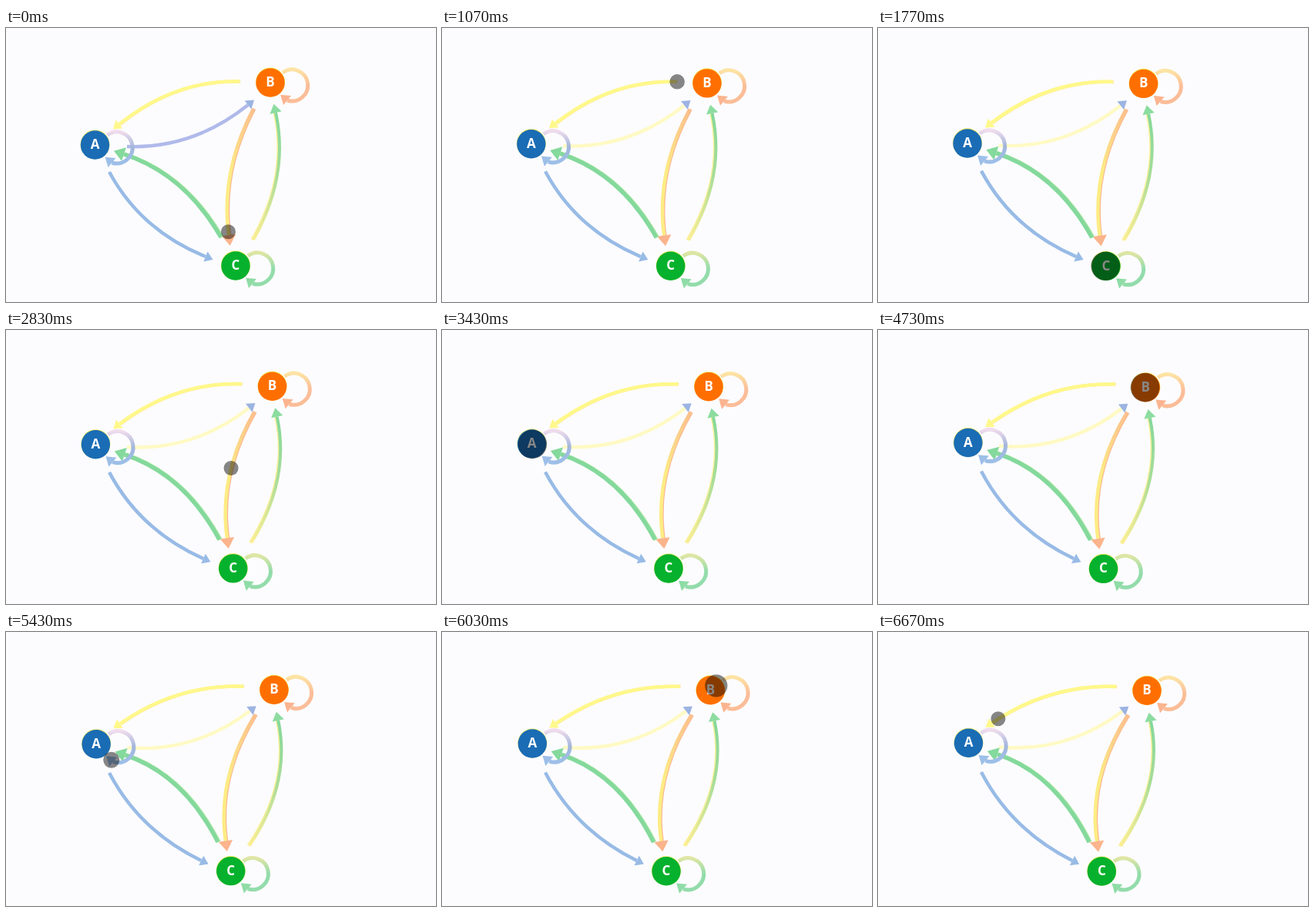
Recreate the animation shown at these times as an HTML page. Size 558 px wide and 356 px high, loop 6710 ms.

```html
<!DOCTYPE html>
<html lang="en">
<head>
<meta charset="utf-8">
<title>Three-state Markov chain</title>
<style>
  html, body { margin: 0; width: 100%; height: 100%; overflow: hidden; background: #fcfcfe; }
  svg { display: block; width: 558px; height: 356px; }
  text { font: 700 17px "Open Sans", "Noto Sans", sans-serif; fill: #fff; text-anchor: middle; }
</style>
</head>
<body>
<svg id="stage" viewBox="0 0 558 356"></svg>
<script>
const LOOP = 6710;
const NODE_R = 19, BALL_R = 9.5, LOOP_R = 20.5;
const stage = document.getElementById('stage');

function add(tag, attrs, parent = stage) {
  const el = document.createElementNS('http://www.w3.org/2000/svg', tag);
  set(el, attrs);
  return parent.appendChild(el);
}
function set(el, attrs) {
  for (const key in attrs) el.setAttribute(key, attrs[key]);
}
const mix = (a, b, k) => a + (b - a) * k;
const mixAll = (a, b, k) => a.map((v, i) => mix(v, b[i], k));

// Positions drift linearly from the first pose to the last.
const nodes = {
  A: { from: [115.5, 152], to: [117.5, 144.3], color: '#1a6cb5' },
  B: { from: [343, 71], to: [349, 76.3], color: '#ff6f00' },
  C: { from: [298, 309], to: [290.3, 311], color: '#05b12d' }
};

// Curves: start, control, end (base of the arrow head).
// Colours: one, or a vertical blend from top to bottom.
const links = {
  BA: { from: [303, 69.5, 219, 67, 147, 125], to: [309, 71, 222, 68, 148, 118],
        width: 4.5, colors: ['#fff88a'], edge: '#fdeaa6' },
  AB: { from: [157, 154, 243, 157, 314, 100], to: [157, 149.5, 246, 157, 317, 103],
        width: 4.5, colors: ['#fffac4'], head: '#9cb4e2' },
  BC: { from: [321, 105, 278, 187, 289, 269], to: [324, 108, 272, 190, 284, 272],
        width: 4.5, colors: ['#fbc08c', '#fdec84', '#fdec84'], edge: '#fbb892', head: '#fbb48c', size: 6 },
  CB: { from: [321, 275, 368, 192, 350, 110], to: [315, 278, 371, 197, 354, 116],
        width: 4, colors: ['#84d89a', '#a8dd98', '#fbee94'], edge: '#fbf09c', head: '#8cdca0', size: 5 },
  CA: { from: [279, 272, 232, 190, 153, 164], to: [274, 273, 230, 184, 155, 159],
        width: 5.5, colors: ['#84d99c'], edge: '#b8ecac', size: 6 },
  AC: { from: [134, 187, 175, 263, 259, 297], to: [134, 182, 173, 257, 252, 297],
        width: 4.5, colors: ['#98bbe6'] },
  AA: { width: 5, colors: ['#f0dcec', '#a2b6dc', '#9dbfe8'], head: '#9dbfe8' },
  BB: { width: 5, colors: ['#fde4a4', '#fbbd98', '#fbbd98'], head: '#fbb48f' },
  CC: { width: 5, colors: ['#dfe6a4', '#93dcab', '#93dcab'], head: '#8fdca6' }
};

// The walk through the states, one hop per unit of phase.
const walk = 'BCBBACABCAABBAABBA';
// [time in ms, phase]: the walk runs at a nearly steady pace.
const pace = [[0, 0.735], [1070, 3.245], [1770, 4.93], [2830, 7.48],
              [4030, 10.37], [5430, 13.757], [6670, 16.72], [6710, 16.81]];

function paint(key, colors) {
  if (colors.length === 1) return colors[0];
  const blend = add('linearGradient', { id: 'blend' + key, x1: 0, y1: 0, x2: 0, y2: 1 });
  colors.forEach((color, i) =>
    add('stop', { offset: i / (colors.length - 1), 'stop-color': color }, blend));
  return `url(#blend${key})`;
}

for (const key in links) {
  const link = links[key];
  const line = { fill: 'none', 'stroke-width': link.width };
  if (link.edge) link.under = add('path', { ...line, stroke: link.edge });
  link.path = add('path', { ...line, stroke: paint(key, link.colors) });
  link.tip = add('path', { fill: link.head || link.colors[0] });
}
for (const key in nodes) {
  const node = nodes[key];
  node.rim = add('circle', { r: NODE_R, fill: '#f4ec5a' });
  node.disc = add('circle', { r: NODE_R - 0.3, fill: node.color });
  node.label = add('text', {});
  node.label.textContent = key;
}
const ball = add('circle', { fill: '#000', 'fill-opacity': 0.47 });

function placeLink(key, k) {
  const link = links[key];
  let d, end, angle;
  if (link.from) {
    const [x0, y0, cx, cy, x1, y1] = mixAll(link.from, link.to, k);
    d = `M${x0} ${y0}Q${cx} ${cy} ${x1} ${y1}`;
    end = [x1, y1];
    angle = Math.atan2(y1 - cy, x1 - cx);
  } else {
    const [x, y] = nodes[key[0]].at;
    end = [x + 22, y + 23];
    d = `M${x + 16} ${y - 13}A${LOOP_R} ${LOOP_R} 0 1 1 ${end[0]} ${end[1]}`;
    angle = Math.atan2(-7.5, -9);
  }
  const size = link.size || link.width;
  set(link.path, { d });
  if (link.under) set(link.under, { d, transform: key === 'CB' ? 'translate(-1.5 0)' : 'translate(1.2 0)' });
  set(link.tip, {
    d: `M0 ${-1.55 * size}L${2.3 * size} 0L0 ${1.55 * size}Z`,
    transform: `translate(${end[0]} ${end[1]}) rotate(${angle * 180 / Math.PI})`
  });
}

function phaseAt(t) {
  const i = pace.findIndex(p => t < p[0]);
  const [t0, p0] = pace[i - 1], [t1, p1] = pace[i];
  return mix(p0, p1, (t - t0) / (t1 - t0));
}

// Each hop: leave the node and shrink, follow the link, grow into the next node.
function placeBall(phase) {
  const hop = Math.floor(phase), part = phase - hop;
  const from = walk[hop], to = walk[hop + 1];
  const path = links[from + to].path;
  const pointAt = p => {
    const q = path.getPointAtLength(path.getTotalLength() * p);
    return [q.x, q.y];
  };
  let at, r = BALL_R;
  if (part < 0.25) {
    const k = (part / 0.25) ** 3;
    at = mixAll(nodes[from].at, pointAt(0), k);
    r = mix(NODE_R, BALL_R, k);
  } else if (part < 0.75) {
    at = pointAt((part - 0.25) * 2);
  } else {
    const k = 1 - (1 - (part - 0.75) / 0.25) ** 3;
    at = mixAll(pointAt(1), nodes[to].at, k);
    r = mix(BALL_R, NODE_R, k);
  }
  set(ball, { cx: at[0], cy: at[1], r });
}

function draw(t) {
  const k = t / 6670;
  for (const key in nodes) {
    const node = nodes[key];
    const [x, y] = node.at = mixAll(node.from, node.to, k);
    set(node.rim, { cx: x, cy: y - 0.6 });
    set(node.disc, { cx: x, cy: y });
    set(node.label, { x, y: y + 5 });
  }
  for (const key in links) placeLink(key, k);
  const fade = Math.min(1, t / 400);
  const tint = mixAll([176, 186, 234], [255, 250, 196], fade).map(Math.round);
  set(links.AB.path, { stroke: `rgb(${tint})` });
  placeBall(phaseAt(t));
}

const begin = performance.now();
function tick() {
  draw((performance.now() - begin) % LOOP);
  requestAnimationFrame(tick);
}
draw(0);
requestAnimationFrame(tick);
</script>
</body>
</html>
```
